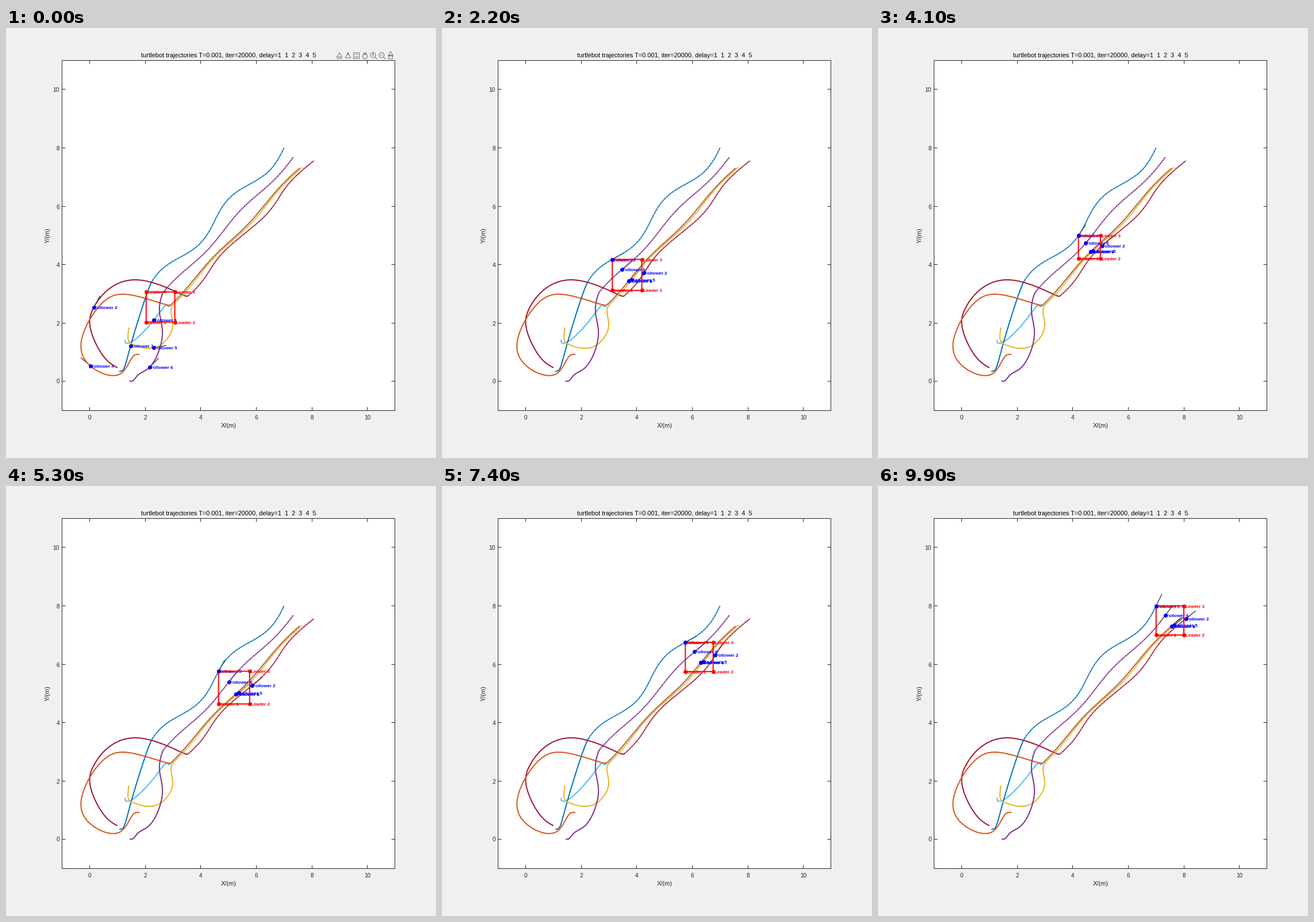
Animation of 748 by 748 pixels, one loop 10000 ms. Source, as a matplotlib script:

```python
import numpy as np
import matplotlib.pyplot as plt
from matplotlib.animation import FuncAnimation
from matplotlib.patches import Rectangle

SIZE, DPI, FRAMES = 748, 100, 100
PT = 72 / DPI                       # points per pixel
JOIN = 7                            # step at which followers reach the formation
DARK, GREY, RED, BLUE = "#262626", "#6e6e6e", "#ff0000", "#0000ff"
LEFT, RIGHT, TOP, BOTTOM = 97.5, 676.5, 56.5, 665.5

plt.rcParams["font.family"] = "Liberation Sans"


def to_px(p):
    return np.array([145.55, 614.9]) + np.asarray(p) * [48.31, -50.8]


def formation(k, a, b):
    """Point with relative coordinates (a, b) in the breathing leader square."""
    k = np.asarray(k, float)
    side = 1 + 0.25 * np.sin(2 * np.pi * k / 50)
    low = 2.5 + 0.05 * k - side / 2
    return np.stack([low + a * side, low + b * side], axis=-1)


def spline(p, t, u):
    """Natural cubic spline through points p at parameters t."""
    h = np.diff(t)
    m, rhs = np.eye(len(t)), np.zeros_like(p)
    for i in range(1, len(t) - 1):
        m[i, i - 1:i + 2] = h[i - 1], 2 * (h[i - 1] + h[i]), h[i]
    rhs[1:-1] = 6 * np.diff(np.diff(p, axis=0) / h[:, None], axis=0)
    c = np.linalg.solve(m, rhs)
    i = np.clip(np.searchsorted(t, u, side="right") - 1, 0, len(h) - 1)
    w = h[i][:, None]
    a = (t[i + 1] - u)[:, None] / w
    b = 1 - a
    return (a * p[i] + b * p[i + 1]
            + ((a**3 - a) * c[i] + (b**3 - b) * c[i + 1]) * w**2 / 6)


class Follower:
    """Approach along a smooth path, then hold a fixed place in the formation.

    The fourth key point is where the robot stands after one step.
    """

    def __init__(self, color, rel, *keys):
        self.color, self.rel = color, rel
        p = np.vstack([keys, formation(JOIN + np.arange(3), *rel)])
        t = np.r_[0, np.cumsum(np.sqrt(np.hypot(*np.diff(p, axis=0).T)))]
        u = np.linspace(0, t[-3], 500)
        self.path = spline(p, t, u)
        self.arc = np.r_[0, np.cumsum(np.hypot(*np.diff(self.path, axis=0).T))]
        done = np.interp(t[3], u, self.arc) / self.arc[-1]
        self.power = np.log(1 - done) / np.log(1 - 1 / JOIN)

    def pos(self, k):
        if k >= JOIN:
            return formation(k, *self.rel)
        d = self.arc[-1] * (1 - (1 - k / JOIN) ** self.power)
        return np.array([np.interp(d, self.arc, c) for c in self.path.T])

    def heading(self, k):
        v = self.pos(k + 0.05) - self.pos(k - 0.05)
        return v / max(np.hypot(*v), 1e-9)


followers = [
    Follower("#4dbeee", (0.56, 0.307), (1.29, 1.43), (1.28, 1.35), (1.4, 1.31),
             (2.31, 2.1), (2.78, 2.61), (2.85, 2.56)),
    Follower("#a2142f", (1.075, 0.56), (1, 0.47), (0.55, 0.8), (0.01, 1.9),
             (0.15, 2.54), (0.67, 3.15), (1.71, 3.48), (3.16, 3.05)),
    Follower("#0072bd", (0, 1), (1.07, 0.35), (1.15, 0.36), (1.22, 0.42),
             (1.47, 1.21), (2.1, 3.11)),
    Follower("#d95319", (0.56, 0.307), (1.79, 0.92), (1.58, 0.88), (1.1, 0.26),
             (0.03, 0.53), (-0.3, 1.38), (0.55, 2.77), (1.44, 2.97), (2.64, 2.66)),
    Follower("#edb120", (0.655, 0.335), (1.41, 1.85), (1.38, 1.47), (1.48, 1.31),
             (2.31, 1.15), (2.87, 1.57), (2.99, 1.99), (2.93, 2.46)),
    Follower("#7e2f8e", (0.333, 0.677), (1.44, 0.02), (1.55, 0.02), (1.75, 0.23),
             (2.16, 0.49), (2.62, 1.61), (2.51, 2.46)),
]
CORNERS = [(0, 0), (1, 0), (1, 1), (0, 1)]

fig = plt.figure(figsize=(SIZE / 100, SIZE / 100), dpi=DPI, facecolor="#f0f0f0")
ax = fig.add_axes([0, 0, 1, 1])
ax.set(xlim=(0, SIZE), ylim=(SIZE, 0))
ax.axis("off")


def line(x, y, color, width=1, z=2, **kw):
    kw.setdefault("solid_capstyle", "butt")
    return ax.plot(x, y, color=color, lw=width * PT, zorder=z, snap=False, **kw)[0]


def label(x, y, s, px, color, ha="center", **kw):
    kw.setdefault("va", "baseline")
    return ax.text(x, y, s, fontsize=px * PT, color=color, ha=ha, **kw)


def draw_axes():
    ax.add_patch(Rectangle((LEFT, TOP), RIGHT - LEFT, BOTTOM - TOP, fc="white",
                           ec=DARK, lw=PT, zorder=1, snap=False))
    for v in range(0, 11, 2):
        x, y = np.floor(to_px((v, v))) + 0.5
        for end, inward in ((TOP, 6), (BOTTOM, -6)):
            line([x, x], [end, end + inward], DARK)
        for end, inward in ((LEFT, 6), (RIGHT, -6)):
            line([end, end + inward], [y, y], DARK)
        label(x, 681, str(v), 10, DARK)
        label(93, y + 4, str(v), 10, DARK, ha="right")
    label(387.5, 51, "turtlebot trajectories T=0.001, iter=20000, "
          "delay=1  1  2  3  4  5", 11, "black")
    label(387.5, 695, "X/(m)", 11, DARK)
    label(72.5, 361, "Y/(m)", 11, DARK, va="center", rotation=90)


def draw_trails():
    k = np.linspace(JOIN, FRAMES, 900)
    for f in followers:
        late = to_px(formation(k, *f.rel)).T
        line(*to_px(f.path).T, f.color, 2)
        line(*late, f.color, 2, alpha=0.75)
        line(*late, f.color, 1, dashes=(3, 3), dash_capstyle="butt")


def ngon(x, y, r, n):
    """Regular polygon outline with a flat base."""
    a = np.pi / 2 + np.pi / n + 2 * np.pi * np.arange(n + 1) / n
    return line(x + r * np.cos(a), y + r * np.sin(a), GREY)


def draw_toolbar():
    """Small grey tool icons above the plot; returns their artists."""
    share, brush, note, hand, zoom_in, zoom_out, home = 580 + 14.85 * np.arange(7)
    icons = [ngon(share, 48, 5, 3), ngon(brush, 49, 5.5, 3), ngon(note, 48, 7, 4),
             ngon(hand, 49.5, 4.5, 7), ngon(home, 46, 5, 3), ngon(home, 50.5, 4.5, 4)]
    bars = [(share - 5, share + 5, 53), (brush - 2, brush + 2, 45),
            (note - 3, note + 3, 46), (note - 3, note + 3, 50)]
    for x in (zoom_in, zoom_out):
        icons += [ngon(x - 1, 47, 4.5, 24), line([x + 2, x + 6], [50, 54], GREY)]
        bars.append((x - 3, x + 1, 47))
    icons += [line([x, x], [42, 47], GREY)
              for x in (zoom_in - 1, brush, hand - 2, hand, hand + 2)]
    return icons + [line([a, b], [y, y], GREY) for a, b, y in bars]


draw_axes()
draw_trails()
toolbar = draw_toolbar()

DOT = dict(ls="", marker="o", ms=7 * PT, mew=0)
TAG = dict(weight="bold", ha="left")
arrows = [line([], [], "black", 1, 1.5) for _ in followers]
tags = [label(0, 0, f"Follower {i + 1}", 8, BLUE, zorder=4, **TAG)
        for i in range(len(followers))]
square = line([], [], RED, 2, 5)
corners = line([], [], RED, 1, 6, **DOT)
leader_tags = [label(0, 0, f"Leader {i + 1}", 8, RED, zorder=6, **TAG)
               for i in range(len(CORNERS))]
dots = line([], [], BLUE, 1, 7, **DOT)


def update(frame):
    k = frame + 1
    for icon in toolbar:
        icon.set_visible(frame == 0)

    lead = to_px([formation(k, *c) for c in CORNERS])
    square.set_data(*np.vstack([lead, lead[:1]]).T)
    corners.set_data(*lead.T)
    for tag, (x, y) in zip(leader_tags, lead):
        tag.set_position((x + 2.6, y + 3))

    spots = np.array([f.pos(k) for f in followers])
    dots.set_data(*to_px(spots).T)
    for f, p, arrow, tag in zip(followers, spots, arrows, tags):
        arrow.set_data(*to_px([p, p + 0.45 * f.heading(k)]).T)
        tag.set_position(to_px(p) + [0.8, 3])
    return [square, corners, dots, *arrows, *tags, *leader_tags, *toolbar]


anim = FuncAnimation(fig, update, frames=FRAMES, interval=100,
                     repeat=True, repeat_delay=0, blit=False)
plt.show()
```
